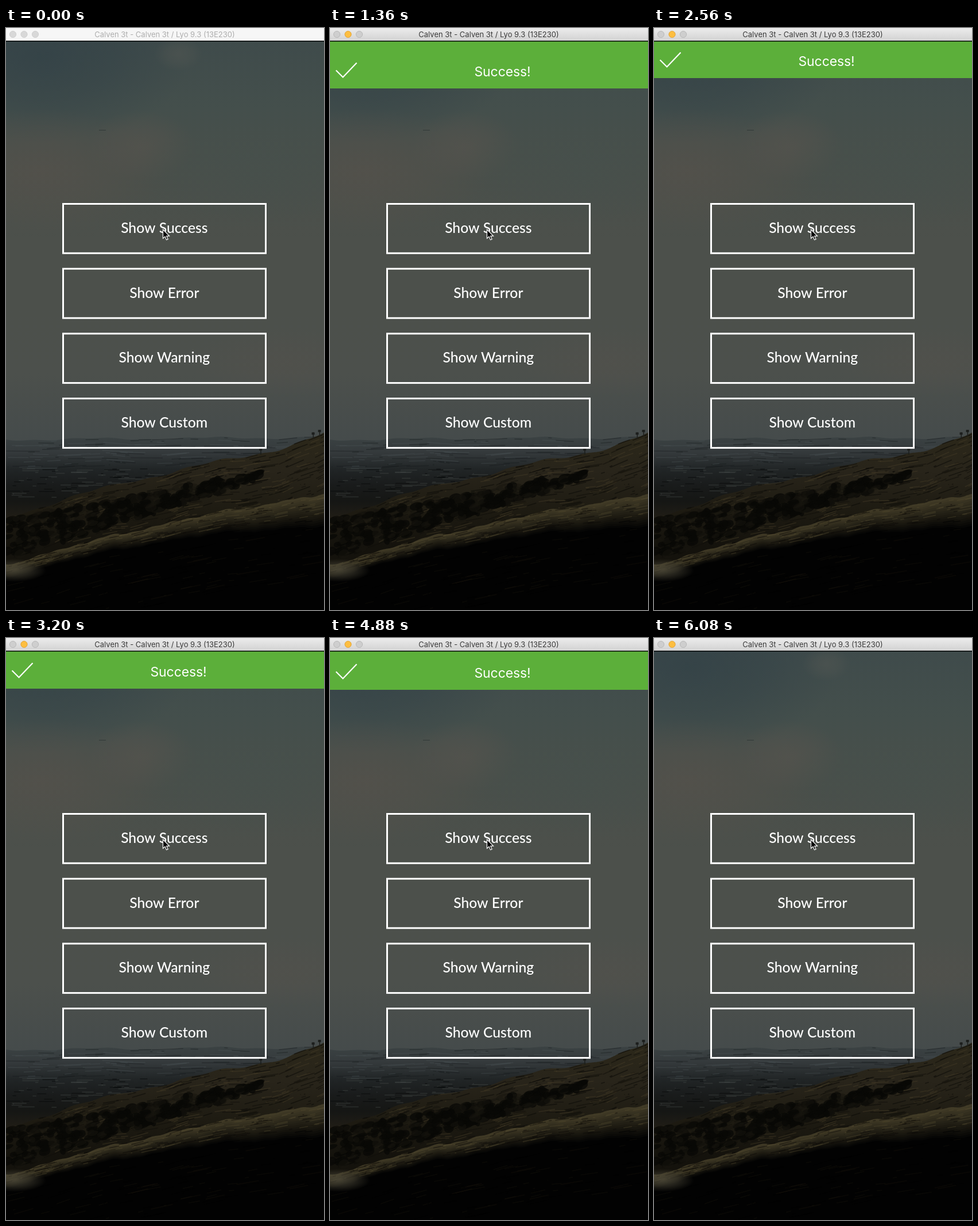
An HTML page with a canvas for the animation above (6160 ms loop, 554 by 1011 pixels).

```html
<!DOCTYPE html>
<html lang="en">
<head>
<meta charset="utf-8">
<title>Drop-down banner</title>
<style>
  html, body { margin: 0; width: 100%; height: 100%; overflow: hidden; background: #000; }
  canvas { display: block; width: 554px; height: 1011px; }
</style>
</head>
<body>
<canvas id="stage" width="554" height="1011"></canvas>
<script>
const W = 554, H = 1011, LOOP = 6160, STEP = 80;
const BAR = 23;            // height of the window title bar
const ACTIVE_AT = 160;     // the click brings the window to the front
const LABELS = ['Show Success', 'Show Error', 'Show Warning', 'Show Custom'];
const ctx = document.getElementById('stage').getContext('2d');

// The banner drops in on a spring, then the same motion runs backwards.
const spring = { start: 327, turn: 3345, half: 930, decay: 0.6586, travel: 143, rest: 88.1 };

function bannerBottom(t) {
  const s = spring;
  const local = (t > s.turn ? 2 * s.turn - t : t) - s.start;
  if (local <= 0) return s.rest - s.travel;
  const a = local / s.half * Math.PI;
  const left = Math.exp(-s.decay * a) * (Math.cos(a) + s.decay * Math.sin(a));
  return Math.round(s.rest - s.travel * left);
}

function seeded(seed) {
  return () => (seed = (seed * 16807) % 2147483647) / 2147483647;
}

function trace(g, points) {
  g.beginPath();
  points.forEach(([x, y], i) => i ? g.lineTo(x, y) : g.moveTo(x, y));
}

function vertical(g, y0, y1, colors) {
  const grad = g.createLinearGradient(0, y0, 0, y1);
  colors.forEach((c, i) => grad.addColorStop(i / (colors.length - 1), c));
  return grad;
}

function glow(g, x, y, rx, ry, rgb, alpha) {
  g.save();
  g.translate(x, y);
  g.scale(rx, ry);
  const grad = g.createRadialGradient(0, 0, 0, 0, 0, 1);
  grad.addColorStop(0, `rgba(${rgb},${alpha})`);
  grad.addColorStop(0.5, `rgba(${rgb},${alpha * 0.6})`);
  grad.addColorStop(1, `rgba(${rgb},0)`);
  g.fillStyle = grad;
  g.fillRect(-1, -1, 2, 2);
  g.restore();
}

// Fills everything below the line y = f(u), with u from 0 to 1 across the stage.
function ridge(g, f, fill) {
  g.beginPath();
  g.moveTo(0, H);
  for (let x = 0; x <= W; x += 2) g.lineTo(x, f(x / W));
  g.lineTo(W, H);
  g.fillStyle = fill;
  g.fill();
}

// Scatters short strokes that follow the line y = f(u), down to a given depth.
function streaks(g, rnd, count, f, depth, colors, length) {
  g.lineWidth = 1.6;
  for (let i = 0; i < count; i++) {
    const u = rnd(), drop = rnd() * depth(u), du = rnd() * length / W;
    g.strokeStyle = colors[Math.floor(rnd() * colors.length)];
    trace(g, [[u * W, f(u) + drop], [(u + du) * W, f(u + du) + drop]]);
    g.stroke();
  }
}

const wave = u => 3 * Math.sin(u * 17) + 1.5 * Math.sin(u * 53);
const horizon = u => 715 - 4 * u + wave(u) * 0.6;
const hillTop = u => 850 - 120 * u - 25 * u ** 6 - 16 * Math.sin(Math.PI * u) + wave(u);
const slope = u => 932 - 122 * u - 10 * Math.sin(Math.PI * u) + wave(u) * 0.4;

function drawSky(g) {
  g.fillStyle = vertical(g, BAR, 715, ['#3f4b4b', '#444f4c', '#494f4a', '#4c504b', '#4c504b', '#4c504c', '#454b4b']);
  g.fillRect(0, 0, W, 730);
  glow(g, 60, 50, 260, 150, '46,62,69', 0.6);
  glow(g, 300, 45, 42, 30, '84,88,83', 0.5);
  glow(g, 235, 205, 95, 62, '84,83,77', 0.75);
  glow(g, 60, 250, 220, 110, '84,81,75', 0.8);
  glow(g, 440, 250, 220, 90, '70,80,76', 0.6);
  glow(g, 490, 580, 170, 60, '84,81,75', 0.45);
  g.fillStyle = 'rgba(36,44,44,.6)';
  g.fillRect(162, 177, 12, 1);
}

function drawPlain(g, rnd) {
  ridge(g, horizon, vertical(g, 710, 850, ['#3b4243', '#34393b', '#212526', '#191b1b', '#151614', '#201d16']));
  streaks(g, rnd, 130, horizon, () => 50, ['rgba(75,84,86,.35)', 'rgba(20,25,27,.35)'], 60);
  streaks(g, rnd, 200, u => 765, () => 55, ['rgba(72,76,74,.4)', 'rgba(6,8,8,.5)'], 30);
}

function drawHill(g, rnd) {
  ridge(g, hillTop, vertical(g, 706, 900, ['#2b2719', '#28241a', '#1e1b12', '#14120c']));
  streaks(g, rnd, 420, hillTop, u => 75 + 25 * u, ['rgba(74,66,42,.4)', 'rgba(8,8,5,.5)', 'rgba(16,14,9,.5)'], 34);

  // hedge, thinning out towards the right
  for (let i = 0; i < 360; i++) {
    const x = rnd() * 440;
    const y = 888 - x * 0.25 + (rnd() - 0.5) * (70 - x * 0.13);
    g.fillStyle = rnd() > 0.3 ? 'rgba(8,8,6,.75)' : 'rgba(22,20,13,.5)';
    g.beginPath();
    g.ellipse(x, y, 5 + rnd() * 8, 3 + rnd() * 5, -0.3, 0, 7);
    g.fill();
  }

  // sunlit slope that falls off into shadow
  const layers = 14;
  for (let k = 0; k <= layers; k++) {
    const light = 1 - k / layers;
    const [r, gr, b] = [62, 56, 36].map(c => Math.round(2 + c * light));
    ridge(g, u => slope(u) + k * (1.6 + 2.4 * u * u) + wave(u * 2) * 0.5, `rgb(${r},${gr},${b})`);
  }
  streaks(g, rnd, 200, slope, u => 14 + 24 * u, ['rgba(88,80,52,.35)', 'rgba(10,9,6,.45)'], 28);
  streaks(g, rnd, 160, u => slope(u) + 30, () => 110, ['rgba(26,22,13,.35)', 'rgba(0,0,0,.5)'], 40);
  glow(g, 15, 942, 55, 20, '84,80,63', 0.7);

  g.fillStyle = '#1c1e1c';
  for (const u of [0.8, 0.965, 0.985]) {
    const x = u * W, y = hillTop(u) - 9;
    g.fillRect(x, y, 1.5, 11);
    g.fillRect(x - 2, y, 5, 4);
  }
}

function drawButtons(g) {
  g.strokeStyle = g.fillStyle = '#fff';
  g.lineWidth = 3;
  g.textAlign = 'center';
  g.font = '500 24.7px Lato, sans-serif';
  LABELS.forEach((label, i) => {
    const y = i * 112.7;
    g.strokeRect(99.5, 305.5 + y, 353, 85.7);
    g.fillText(label, 275.8, 356 + y);
  });
}

function makeScene() {
  const scene = document.createElement('canvas');
  scene.width = W;
  scene.height = H;
  const g = scene.getContext('2d');
  const rnd = seeded(41);
  drawSky(g);
  drawPlain(g, rnd);
  drawHill(g, rnd);
  drawButtons(g);
  return scene;
}

function drawBanner(bottom) {
  if (bottom <= BAR) return;
  ctx.save();
  ctx.beginPath();
  ctx.rect(0, BAR, W, H);
  ctx.clip();
  ctx.fillStyle = '#5caf3a';
  ctx.fillRect(0, BAR, W, bottom - BAR);
  ctx.translate(0, bottom - 88);
  ctx.strokeStyle = ctx.fillStyle = '#fff';
  ctx.lineWidth = 2.2;
  trace(ctx, [[10.5, 56.5], [22.5, 68.5], [46.5, 43.5]]);
  ctx.stroke();
  ctx.font = '400 23px Inter, sans-serif';
  ctx.letterSpacing = '-0.1px';
  ctx.textAlign = 'center';
  ctx.fillText('Success!', 300.5, 67);
  ctx.restore();
}

function drawTitleBar(active) {
  ctx.fillStyle = active ? vertical(ctx, 0, 22, ['#ececec', '#d2d2d2']) : '#f6f6f6';
  ctx.fillRect(0, 0, W, 22);
  ctx.fillStyle = '#060808';
  ctx.fillRect(0, 22, W, 1.5);
  ctx.lineWidth = 1;
  [12, 31.5, 51].forEach((x, i) => {
    const lit = active && i === 1;
    ctx.beginPath();
    ctx.arc(x, 11, 5.6, 0, 7);
    ctx.fillStyle = lit ? '#fdbe40' : active ? '#cecece' : '#d8d8d8';
    ctx.strokeStyle = lit ? '#e2a336' : active ? '#b9b9b9' : '#cfcfcf';
    ctx.fill();
    ctx.stroke();
  });
  ctx.fillStyle = active ? '#3a3a3a' : '#adadad';
  ctx.font = '400 13px Inter, sans-serif';
  ctx.textAlign = 'center';
  ctx.fillText('Calven 3t - Calven 3t / Lyo 9.3 (13E230)', 276.5, 16);
}

function drawCursor(x, y) {
  ctx.save();
  ctx.translate(x, y);
  trace(ctx, [[0, 0], [0, 15.5], [3.5, 12.3], [6, 18], [8.6, 16.9], [6.2, 11.4], [11, 11.4]]);
  ctx.closePath();
  ctx.fillStyle = '#000';
  ctx.strokeStyle = '#fff';
  ctx.lineWidth = 1.2;
  ctx.fill();
  ctx.stroke();
  ctx.restore();
}

const scene = makeScene();
const begin = performance.now();

function render(now) {
  const elapsed = Math.max(0, now - begin) % LOOP;
  const t = Math.floor(elapsed / STEP) * STEP;
  ctx.drawImage(scene, 0, 0);
  drawBanner(bannerBottom(t));
  drawTitleBar(t >= ACTIVE_AT);
  drawCursor(273.5, 350);
  requestAnimationFrame(render);
}
render(begin);
</script>
</body>
</html>
```
